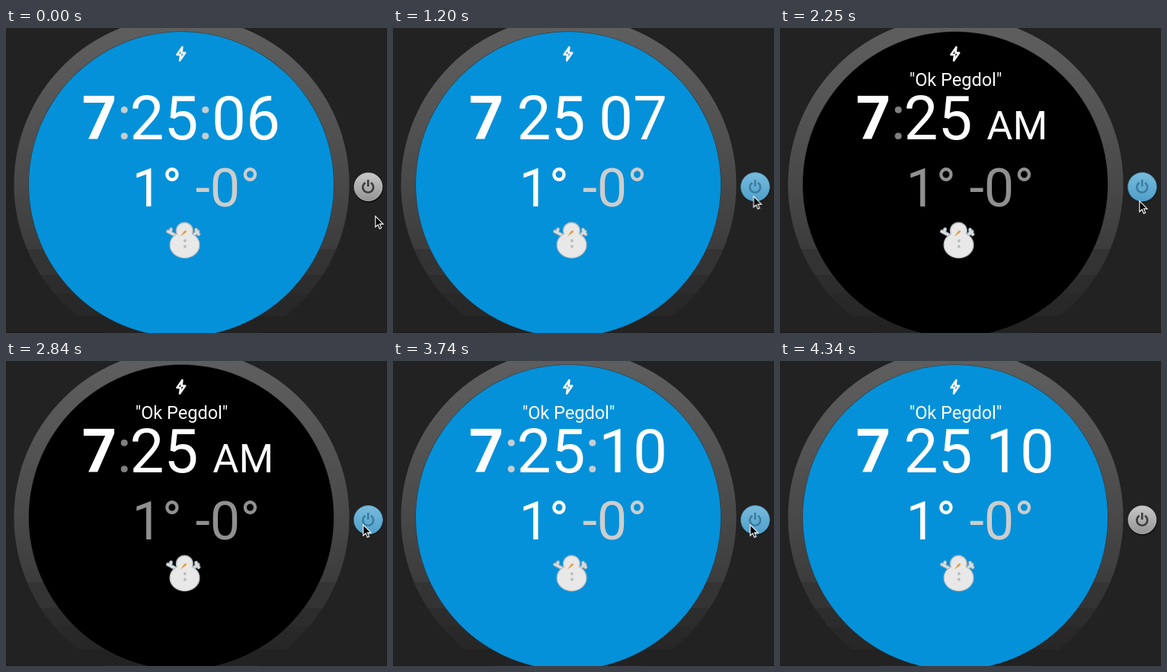
An HTML page for the animation above (4630 ms loop, 500 px wide and 400 px high).

```html
<!DOCTYPE html>
<html lang="en">
<head>
<meta charset="utf-8">
<title>Watch face</title>
<style>
  html, body { margin: 0; width: 100%; height: 100%; overflow: hidden; background: #222; }
  svg { display: block; width: 500px; height: 400px; }
  text { font-family: Roboto, "Noto Sans", sans-serif; white-space: pre; }
  .time { font-size: 80px; fill: #fff; }
  .ampm { font-size: 52.3px; fill: #fff; }
  .temp { font-size: 70px; }
  .phrase { font-size: 23.5px; fill: #fff; text-anchor: middle; }

  /* Every part changes in hard steps on one shared 4630 ms clock. */
  .day, .dark, .colons, .s06, .s07, .s10, .phrase, .hover, .cursor {
    animation: 4630ms step-end infinite;
  }
  .day { animation-name: day; }
  .dark { animation-name: dark; }
  .colons { animation-name: blink; }
  .s06 { animation-name: s06; }
  .s07 { animation-name: s07; }
  .s10 { animation-name: s10; }
  .phrase { animation-name: phrase; }
  .hover { animation-name: hover; }
  .cursor { animation-name: cursor; }

  @keyframes day { 0%, 80.77%, 100% { opacity: 1 } 38.87% { opacity: 0 } }
  @keyframes dark { 0%, 80.77%, 100% { opacity: 0 } 38.87% { opacity: 1 } }
  @keyframes blink {
    0%, 16.19%, 38.87% { opacity: 1 }
    3.23%, 25.91%, 90.49%, 100% { opacity: 0 }
  }
  @keyframes s06 { 0% { opacity: 1 } 16.19%, 100% { opacity: 0 } }
  @keyframes s07 { 0%, 38.87%, 100% { opacity: 0 } 16.19% { opacity: 1 } }
  @keyframes s10 { 0% { opacity: 0 } 80.77%, 100% { opacity: 1 } }
  @keyframes phrase {
    0% { opacity: 0 }
    38.87% { opacity: .16 }
    42.11% { opacity: .58 }
    45.35%, 100% { opacity: 1 }
  }
  @keyframes hover {
    0%, 51.83%, 77.53%, 87.25%, 100% { opacity: 0 }
    12.95%, 58.09%, 80.77% { opacity: 1 }
  }
  @keyframes cursor {
    0% { transform: translate(484px, 246px) }
    12.95% { transform: translate(473px, 227px) }
    16.19% { transform: translate(471px, 222px) }
    19.43% { transform: translate(472.5px, 220px) }
    48.59% { transform: translate(471px, 226px) }
    51.83% { transform: translate(466px, 279px) }
    54.85% { transform: translate(464px, 287px) }
    58.09% { transform: translate(464px, 224px) }
    61.33% { transform: translate(468px, 214px) }
    84.01% { transform: translate(467px, 215px) }
    87.25% { transform: translate(472px, 344px) }
    90.49% { transform: translate(472px, 398px) }
    93.73%, 100% { transform: translate(472px, 420px) }
  }
</style>
</head>
<body>
<svg viewBox="0 0 500 400">
  <defs>
    <linearGradient id="bezel" gradientUnits="userSpaceOnUse" x1="0" y1="0" x2="0" y2="400">
      <stop offset="0" stop-color="#5e5e5e"/>
      <stop offset=".25" stop-color="#555"/>
      <stop offset=".52" stop-color="#484848"/>
      <stop offset=".725" stop-color="#3c3c3c"/>
      <stop offset=".725" stop-color="#343434"/>
      <stop offset=".81" stop-color="#333"/>
      <stop offset=".81" stop-color="#2d2d2d"/>
      <stop offset=".87" stop-color="#2c2c2c"/>
      <stop offset=".87" stop-color="#292929"/>
      <stop offset=".945" stop-color="#272727"/>
      <stop offset=".945" stop-color="#222"/>
    </linearGradient>
    <linearGradient id="steel" x2="0" y2="1">
      <stop offset="0" stop-color="#c8c8c8"/>
      <stop offset="1" stop-color="#949494"/>
    </linearGradient>
    <linearGradient id="sky" x2="0" y2="1">
      <stop offset="0" stop-color="#78bbdc"/>
      <stop offset="1" stop-color="#4f9fca"/>
    </linearGradient>
    <path id="power" d="M471.5 202.8A7 7 0 1 0 478.9 202.8M475.2 199V208" fill="none" stroke-width="2.6"/>
    <path id="arms" d="M222.5 272L212.5 266.8M215.5 268L216.5 264M246 271.5L252 267M250 268L249.5 264.5M251 268.5L252.8 270.5"/>
  </defs>

  <rect width="500" height="400" fill="#222"/>
  <rect y="399" width="500" height="1" fill="#1a1717"/>
  <circle cx="230.5" cy="205" r="220" fill="url(#bezel)"/>
  <circle cx="230" cy="205" r="200.5" fill="#2d3338"/>

  <g class="day">
    <circle cx="230" cy="205" r="200" fill="#0491d9"/>
    <g class="time">
      <g class="colons" fill="#c6cdd1">
        <text x="145.4" y="145.7">:</text>
        <text x="252" y="145.7">:</text>
      </g>
      <text class="s06" x="270" y="145.7">06</text>
      <text class="s07" x="270" y="145.7">07</text>
      <text class="s10" x="270" y="145.7">10</text>
    </g>
    <text class="temp" y="233.5"><tspan x="165.5" fill="#fff">1°</tspan><tspan x="248.5" fill="#cdcdcd">-0°</tspan></text>
  </g>

  <g class="dark">
    <circle cx="230" cy="205" r="200"/>
    <text class="time" x="145.4" y="145.7" style="fill:#808080">:</text>
    <text class="ampm" x="271.3" y="145.7">AM</text>
    <text class="temp" y="233.5" fill="#909090"><tspan x="165.5">1°</tspan><tspan x="248.5">-0°</tspan></text>
  </g>

  <text class="time" y="145.7"><tspan x="99.5" font-weight="700">7</tspan><tspan x="162.5">25</tspan></text>
  <text class="phrase" x="230.5" y="76">"Ok Pegdol"</text>

  <path d="M231.4 25L224.4 35H229.2L228 42.8L235.2 32.6H230.4Z" fill="none" stroke="#f4f4f4" stroke-width="2.6" stroke-linejoin="round"/>

  <g class="snowman">
    <g fill="none" stroke-linecap="round" stroke-linejoin="round">
      <use href="#arms" stroke="#a3adb3" stroke-width="5"/>
      <use href="#arms" stroke="#d8dfe2" stroke-width="2.8"/>
    </g>
    <g fill="#e8e8e8" stroke="#b9bdbf" stroke-width="1.4">
      <ellipse cx="234.5" cy="284.5" rx="19.3" ry="17"/>
      <circle cx="234.3" cy="266" r="10.8"/>
    </g>
    <ellipse cx="234.5" cy="284.5" rx="18.6" ry="16.3" fill="#e8e8e8"/>
    <path d="M228.8 273.5L233.2 267Q236 264.5 237 266.2Q237.4 267.6 235.2 269Z" fill="#e0a045"/>
    <circle cx="234.8" cy="279" r="1.9" fill="#b8bbbd"/>
    <circle cx="234.8" cy="286.5" r="1.9" fill="#b8bbbd"/>
  </g>

  <circle cx="476" cy="210" r="19" fill="#111"/>
  <circle cx="475.4" cy="208.3" r="18.4" fill="url(#steel)" stroke="#dcdcdc" stroke-width=".6"/>
  <use href="#power" stroke="#3c3c3c"/>
  <g class="hover">
    <circle cx="475.4" cy="208.5" r="19" fill="url(#sky)" stroke="#2d7299" stroke-width=".6"/>
    <use href="#power" stroke="#3b7c9f"/>
  </g>

  <path class="cursor" d="M.8 .8V15L4.1 12L6.3 17.2L8.6 16.2L6.4 11.1H11Z" fill="#000" stroke="#fff" stroke-width="1.1"/>
</svg>
</body>
</html>
```
